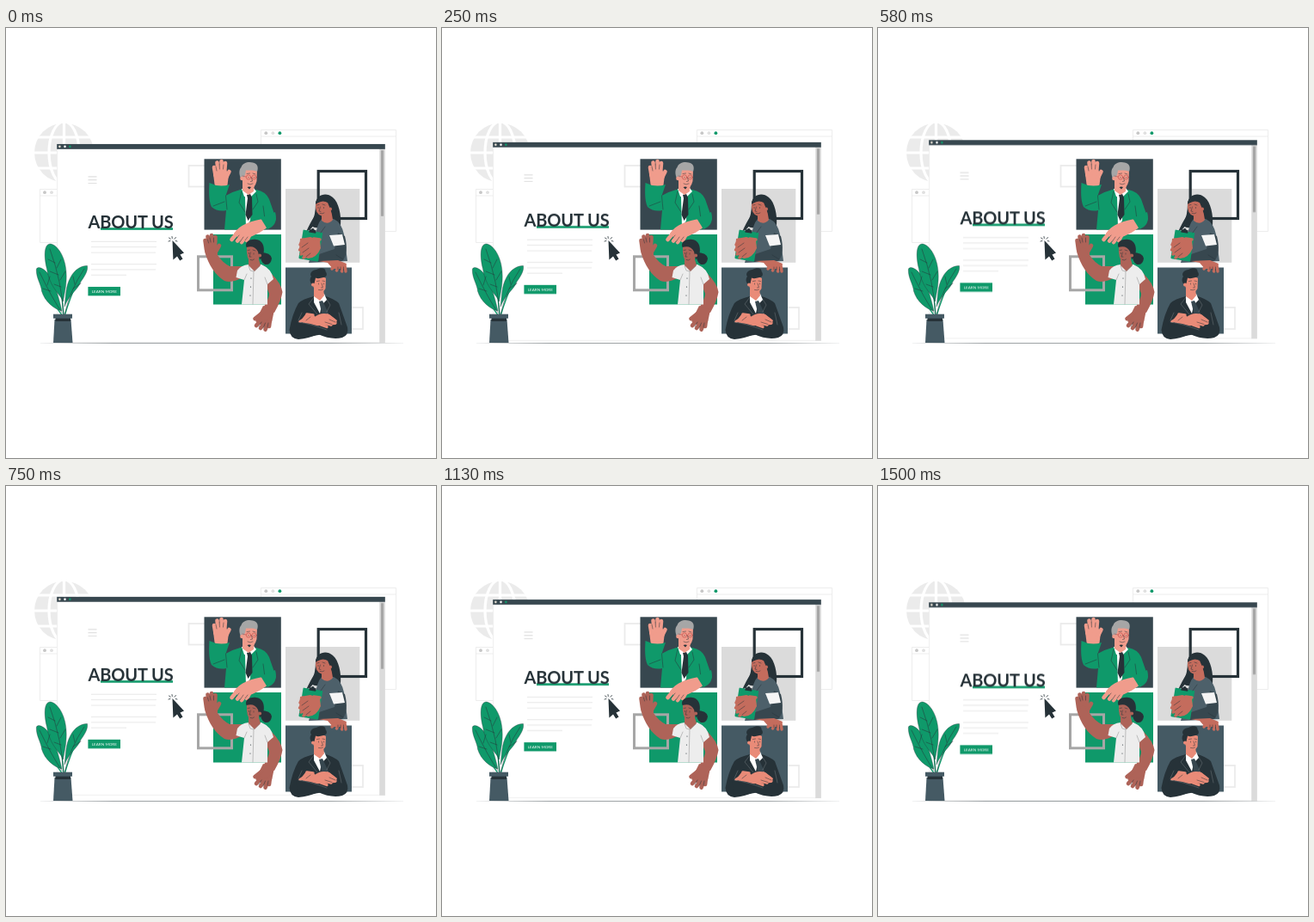
These frames come from a looping animation (500x500 px, 1540 ms). An HTML page:

```html
<!DOCTYPE html>
<html lang="en">
<head>
<meta charset="utf-8">
<title>About us</title>
<style>
  html, body { margin: 0; width: 100%; height: 100%; overflow: hidden; background: #fff; }
  svg { display: block; width: 100vw; height: 100vh; }
  text { font-family: Lato, sans-serif; }
  .dark { fill: #37474f; }
  .slate { fill: #455a64; }
  .ink { fill: #263238; }
  .green { fill: #0f996a; }
  .white { fill: #fff; }
  .box { fill: none; stroke: #ebebeb; }
  .s1 { fill: #f09c8c; stroke: #f09c8c; }
  .s2 { fill: #ae6358; stroke: #ae6358; }
  .s3 { fill: #c46c5d; stroke: #c46c5d; }
  .s4 { fill: #e98b78; stroke: #e98b78; }
  .s1, .s2, .s3, .s4 { stroke-width: 0; }
  .f { fill: none; stroke-linecap: round; stroke-linejoin: round; }
  .f4 { stroke-width: 4.6; }
  .f3 { stroke-width: 3.4; }
  .l { fill: none; stroke: #263238; stroke-width: .5; stroke-linecap: round; stroke-linejoin: round; }
  .pale { stroke: #fff; opacity: .35; }
</style>
</head>
<body>
<svg viewBox="0 0 500 500">
  <defs>
    <linearGradient id="floor" gradientUnits="userSpaceOnUse" x1="40" x2="462" y1="0" y2="0">
      <stop offset="0" stop-color="#263238" stop-opacity=".1"/>
      <stop offset=".2" stop-color="#263238" stop-opacity=".75"/>
      <stop offset=".8" stop-color="#263238" stop-opacity=".75"/>
      <stop offset="1" stop-color="#263238" stop-opacity=".1"/>
    </linearGradient>
  </defs>

  <!-- globe -->
  <circle cx="67.5" cy="145" r="34.5" fill="#ebebeb"/>
  <g fill="none" stroke="#fff" stroke-width="3.2">
    <ellipse cx="67.5" cy="145" rx="17.5" ry="36"/>
    <path d="M67.5 109V181M32 145H103M36 127H99M36 163H99"/>
  </g>

  <!-- back windows -->
  <g class="box" stroke-width=".9">
    <path d="M296.5 118.5H453.5V236.5H296.5ZM296.5 126H453.5"/>
    <path d="M39.5 187.5H120V249.5H39.5ZM39.5 195H120"/>
  </g>
  <circle cx="302.3" cy="122.2" r="1.9" fill="#c7c7c7"/>
  <circle cx="310.4" cy="122.2" r="1.9" fill="#e0e0e0"/>
  <circle cx="318.4" cy="122.2" r="1.9" class="green"/>
  <circle cx="45" cy="191.2" r="1.9" fill="#c7c7c7"/>
  <circle cx="53" cy="191.2" r="1.9" fill="#e0e0e0"/>

  <!-- floating window -->
  <g id="page">
    <rect x="59.5" y="135.5" width="381" height="230.5" fill="#fff" stroke="#ebebeb" stroke-width=".8"/>
    <rect x="434.2" y="140" width="6.6" height="226.3" fill="#dbdbdb"/>
    <rect x="435.9" y="142.6" width="3.2" height="76.5" fill="#a6a6a6"/>
    <rect x="59.2" y="135.2" width="381.6" height="6" class="dark"/>
    <circle cx="62.4" cy="138.2" r="1.3" fill="#e6dfd3"/>
    <circle cx="68.5" cy="138.2" r="1.3" class="white"/>
    <circle cx="74.4" cy="138.2" r="1.3" class="green"/>
    <path d="M95.5 173.2H105.5M95.5 177H105.5M95.5 180.8H105.5" stroke="#e0e0e0" stroke-width="1.1"/>
    <rect x="110" y="232.6" width="84" height="2.6" class="green"/>
    <text x="95.4" y="233.5" font-size="20" font-weight="700" letter-spacing="-.12" class="ink">ABOUT US</text>
    <path id="copy" stroke="#dedede" stroke-width=".7"/>
    <rect x="95.4" y="301.3" width="37.6" height="10.4" class="green"/>
    <text x="114.3" y="308.2" font-size="4.6" text-anchor="middle" class="white">LEARN MORE</text>
  </g>

  <rect x="40" y="366.2" width="422" height=".6" fill="url(#floor)"/>

  <!-- plant -->
  <path class="l" style="stroke-width:1.4;stroke:#0f996a" d="M67 336Q66 318 62 292M66 335Q58 325 48 306M68 335Q74 314 84 293"/>
  <g class="green" stroke="#263238" stroke-width=".35">
    <path d="M65 329C56 327 45 318 41.5 306C41 298 35 291 35.3 281C36 276 44 279 49 286C56 295 61 311 65 329Z"/>
    <path d="M68 324C70 310 69 301 75 290C80 280 89 276 94.5 276.5C95.5 282 92 288 87 295C84 304 74 309 68 324Z"/>
    <path d="M66.500 318C62 308 51 302 47.500 280C44 266 44 251 51.500 251C60 252 69 266 70 284C71 297 68 308 66.500 318Z"/>
  </g>
  <path class="l" d="M67 334Q65 295 51 257M65 331Q54 315 39 284M68 334Q74 305 91 280M57 273L49 269M61 287L51 283M64 301L56 298M59 279L64 269M63 293L69 283M52 306L43 303M48 299L51 289M78 303L87 297M80 298L78 289"/>
  <path d="M56.5 339H75.5L77.500 366H55Z" class="slate"/>
  <rect x="57.5" y="337" width="17.500" height="4" class="ink"/>
  <rect x="55" y="332.7" width="22" height="5" class="slate"/>

  <!-- frames behind people -->
  <rect x="212.5" y="160" width="24" height="24.5" class="box" stroke-width="1.8"/>
  <rect x="391" y="325" width="24" height="25" class="box" stroke-width="1.8"/>
  <rect x="230.5" y="152.3" width="89.3" height="82.3" class="dark"/>
  <rect x="241" y="240" width="79" height="81.5" class="green"/>
  <rect x="223.5" y="265.8" width="39" height="39" fill="none" stroke="#a6a6a6" stroke-width="3"/>
  <rect x="325" y="187" width="86.3" height="85.8" fill="#dbdbdb"/>
  <rect x="363.2" y="166.5" width="55.3" height="55" fill="none" stroke="#263238" stroke-width="3.2"/>
  <rect x="325" y="278.5" width="77" height="77" class="slate"/>

  <!-- man waving -->
  <g>
    <path class="s1" d="M243 185L241 170Q246 161 256 165L259 171L257 186Z"/>
    <path class="s1 f f4" d="M243.5 171L242 162M247 169L245.500 156.5M251 169L250.500 155M254 169L255 157M255 176L259.500 167"/>
    <path class="l" d="M245 166L244 161M248.500 164L248 158M252.500 164L253 159"/>
    <path class="green" d="M236.5 180Q248 186 260 182L255.500 195Q264 190 274 187.5L291 188Q302 190 306 199L314 222Q312 229 301 234.6H254L256 212Q246 214 239 208C235.5 200 236 190 236.5 180Z"/>
    <path class="white" d="M274 187L288 186L291 190L284 197L277 196Z"/>
    <path class="white" d="M278 196L285 196L284 224L279 232Z"/>
    <path class="ink" d="M280 194L284 193L286 197L286.500 217L281.500 224L278.500 217L281 198Z"/>
    <path class="s1" d="M275 173L289 179L288 190L282 194L275 189Z"/>
    <path class="s1" d="M274 166Q286 159 292 165L291.500 178Q289 188 282.500 187Q274 183 274 166Z"/>
    <path fill="#a6a6a6" d="M273.500 176C270.500 170 271 164 273.500 162C275 156 283 155 287 156.500C292 157 294 162 292 167C289 165 284 165.500 279 165.500Q278.500 171 276.500 174Z"/>
    <circle cx="274.5" cy="175" r="2.3" class="s1"/>
    <g class="l" style="stroke:#b23a3a"><circle cx="282" cy="173.5" r="2.7"/><circle cx="288.5" cy="173.5" r="2.5"/><path d="M279 173L275 172"/></g>
    <path class="l" d="M280 169.5L283.5 169M287 169L290 170M282 173.5V174M288.5 173.5V174M285.5 174L286.5 178L284.5 178.5M281 181Q284 183 287 181"/>
    <path class="ink" d="M280.5 185Q283 184 285 185L283 187.5Z"/>
    <path class="l" d="M255.500 195L257 211M299 207L301 222M291 193L293 202L287 211M241 207L254 202M274 190L271 203L278 214"/>
    <path class="s1" d="M302 222C286 223 271 229 265 239Q274 249 280 244Q295 240 307 229Z"/>
    <path class="s1 f f4" d="M270 237L262.5 246M275 240L269 247.5M280 240L274 249M285 238L280 247"/>
    <path class="l" d="M271 241L266 247M276 243L272 249M281 243L278 247"/>
    <path class="green" d="M296 221L313 214Q317 229 304 234Z"/>
  </g>

  <!-- woman in white shirt -->
  <g>
    <path class="s2" d="M231 260L234 249L246 253L246 264Q252 273 260 277L277 277L275 290Q263 297 254 294Q238 284 231 260Z"/>
    <path class="s2 f f4" d="M233 258L231.5 247M236 254L234.5 242.5M240 254L239 241M243 255L243.5 243M244 260L248 253"/>
    <path class="l" d="M235.5 250L234.5 246M238 249L237 244M241.5 249V244"/>
    <path class="ink" d="M296 261Q308 261 309 268Q308 276 301 275Q295 272 296 261Z"/>
    <path class="s2" d="M300 284L309 286Q320 297 321.500 307Q320 317 312 331L298 327Q306 315 306 309L302 298Z"/>
    <path fill="#ededed" d="M282 275Q273 276 269 282L267.500 290L277 293L274 321.500H304L304 298L311 292Q309 280 297 275Z"/>
    <path class="s2" d="M282 267L293 266L296 276L289 283L282 276Z"/>
    <path class="s2" d="M280 254Q289 248 295 256L294 269Q290 275 285 273Q279 268 280 254Z"/>
    <path class="ink" d="M279.500 255C277 248 285 245 291 246C300 247 302 258 298 267L295 269L293 260Q289 252 279.500 255Z"/>
    <circle cx="295" cy="264.5" r="2.1" class="s2"/>
    <path class="l" d="M281 258.5L283.5 258M287 258L290 259M282.5 261.5V262.5M288 262V263M284.5 261L283 266H285M284 269.5Q286.5 271 288.5 269"/>
    <path class="l" style="stroke:#888" d="M288 283L287 321M282 276L284 282L288 283L295 277M304 298L301 290M277 293L280 286"/>
    <g class="ink"><circle cx="285" cy="291" r=".6"/><circle cx="284.5" cy="301" r=".6"/><circle cx="284" cy="311" r=".6"/></g>
    <path class="s2" d="M299 323L312 328L309 342L301 348L290 341Z"/>
    <path class="s2 f f4" d="M297 332L289.500 338M296 340L291 346M301 342L296 349M305 342L301.5 350.500M307 339L306 347"/>
    <path class="l" d="M297 342L294 347M301.5 343L299 349M305 343L304 348"/>
  </g>

  <!-- woman with clipboard -->
  <g>
    <path class="ink" d="M360 204C361 194 372 190 380 197C387 203 390 217 389 230L363 232Q354 233 355 226Q360 219 360 204Z"/>
    <path fill="#4d606a" d="M367 222L381 222Q390 226 393 240L397 271L352 273L359 247Q361 228 367 222Z"/>
    <path class="s3" d="M367 214L378 211L380 223Q374 230 367 224Z"/>
    <path class="s3" d="M360 204Q369 198 376 204L377 212Q374 219 367 218.500Q359 216 360 204Z"/>
    <path class="ink" d="M360 205C360 196 369 192 377 198L384 210L381 221Q377 210 374 203Q368 199 360 205Z"/>
    <circle cx="377" cy="210.5" r="2" class="s3"/>
    <path class="l" d="M361.5 206L364 205.5M368 205L371 206M363 208.5V209.5M369.5 208.5V209.5M365.5 208L364 213L366 213.5M365 215.500Q368 216.500 370 215"/>
    <path class="ink" d="M361 219Q360 232 349 237Q354 226 358 220Z"/>
    <path class="dark" d="M364 263L382 257L386 238L394 242Q399 262 391 271L362 272Z"/>
    <path fill="#f5f5f5" d="M376 241L391 240L394 252L381 253.5Z"/>
    <g transform="rotate(9 354 252)">
      <rect x="343" y="236" width="23" height="34" rx="1" class="green"/>
      <rect x="350" y="234.5" width="8" height="3.5" class="ink"/>
      <circle cx="354" cy="234.500" r="1.8" class="ink"/>
    </g>
    <path class="s3" d="M342 245L354 243L365 247L366 256Q361 268 351 268Q343 265 341 258Z"/>
    <path class="s3 f f3" d="M345 246L342 252M346 252L341.500 258M348 258L343 263M352 263L346 267M358 245L365 246"/>
    <path class="l" d="M351 250L344 255M352 256L345 261M354 262L349 266"/>
    <path class="s3" d="M364 271L386 270L396 274L394 280L380 280L374 273Z"/>
    <path class="s3 f f3" d="M383 276L379 280M387 277L384.5 282M391 277L390.5 283M394 276L395 283"/>
    <path class="l" d="M384 264L392 269M366 238L371 231M386 278V281M389 278V281M392.5 278V282"/>
  </g>

  <!-- man with crossed arms -->
  <g>
    <path class="ink" d="M358 312Q345 315 340 320Q333 332 329.5 351Q330 361 340 362Q352 361 363 356Q378 363 391 360Q399 357 397 348L387 320Q382 315 369 311Z"/>
    <path class="white" d="M358 310L370 309L373 316L367 322L365 332L358 319Z"/>
    <path fill="#37474f" d="M364 318L368 317L376 334L369 339Z"/>
    <path class="s4" d="M358 302L369 303L370 311L365 317L358 312Z"/>
    <path class="s4" d="M357 290Q366 286 372 291L371.500 303Q368 309 363 307.500Q355 304 357 290Z"/>
    <path class="ink" d="M356.500 299C353 296 353 291 355 289C352 285 357 281 361 281C366 278 372 279 371.500 283C374 286 373 290 369 290Q363 292 360 290.500Q359 295 358.500 297Z"/>
    <circle cx="357" cy="298.5" r="2" class="s4"/>
    <path class="l" d="M361.5 294.5L364.500 294M368 294L370.500 294.5M363.500 297V298M369.500 297V298M367 297L368.500 301.5L366.500 302M363.500 304.5Q366.500 305.500 368.500 304"/>
    <path class="s4" d="M358 337Q365 330 376 333L385 340L383 345L366 346Z"/>
    <path class="s4 f f3" d="M374 334L382 340M372 338L383 343M368 342L378 345M366 345L373 347.5"/>
    <path class="s4" d="M342 341L349 332L359 335L369 345L360 347L350 345Z"/>
    <path class="s4 f f3" d="M350 333L357 334M348 338L342 341.5M352 341L346 343.5"/>
    <path class="l" d="M376 339L383 342M371 342L379 344.5M354 336L349 340"/>
    <path class="ink" d="M337 342Q353 342 373 350L369 356L340 361Z"/>
    <path class="l pale" d="M340 342Q355 344 373 351M344 331L340 340M387 331L390 345M358 313L352 321L362 333M372 314L377 322L373 330"/>
  </g>

  <!-- pointer -->
  <path d="M193.5 247L194.4 269.500L199 265.4L202.2 270.600L205.500 268.6L202.5 263.5L207 261.5Z" class="ink"/>
  <path class="l" style="stroke-width:.8" d="M189 248L191 247.5M189.5 244L191.3 245.2M193 242.5L193.3 244.5M197.5 243.5L196 245.2M199 248L197.2 247.5"/>
</svg>
<script>
  const lines = [[248.7, 175], [255, 175], [261.5, 174], [275, 175], [281.3, 174], [287.6, 140]];
  document.getElementById("copy").setAttribute("d",
    lines.map(([y, end]) => `M99 ${y}H${end}`).join(""));

  // Linear float, shown in 37 held steps per loop.
  const steps = 37, rise = 6.67;
  const first = -rise * 2 / steps;
  const at = (k, y) => ({ offset: k / steps, transform: `translateY(${y}px)` });
  document.getElementById("page").animate(
    [at(0, first), at(17.5, -rise), at(36, 0), at(steps, first)],
    { duration: 1540, iterations: Infinity, easing: `steps(${steps}, end)` }
  );
</script>
</body>
</html>
```
